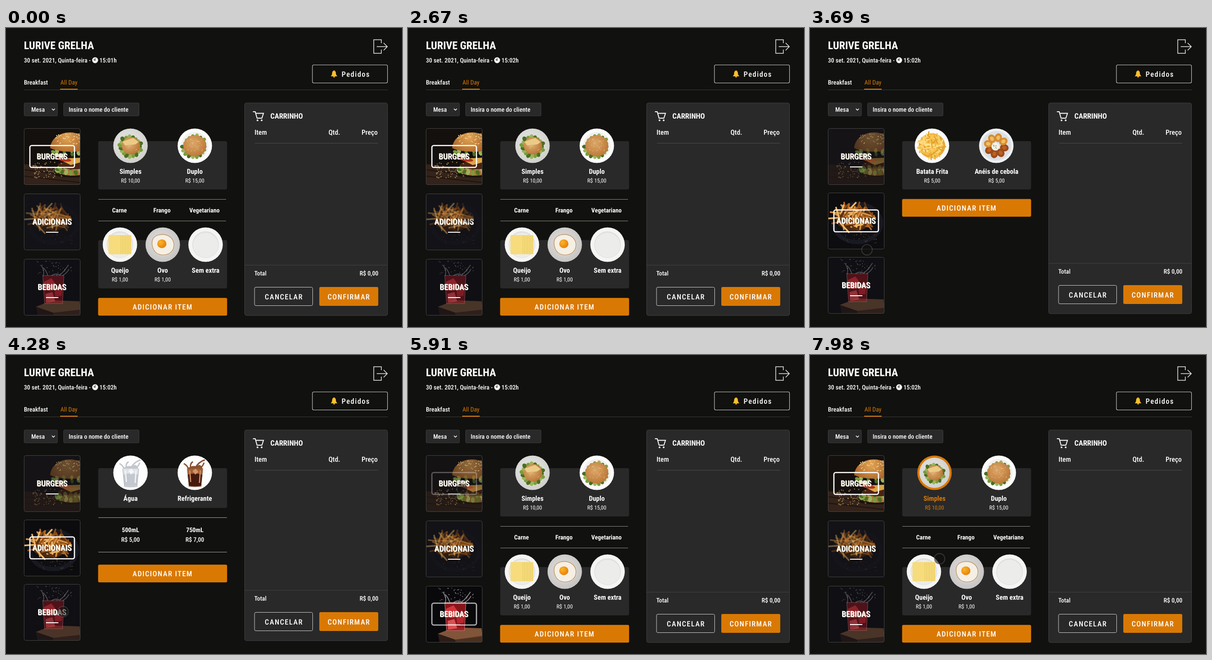
An HTML page with a canvas that plays this animation: 862 px wide and 650 px high, repeating every 8 s.

```html
<!DOCTYPE html>
<html lang="pt-BR">
<head>
<meta charset="utf-8">
<title>Cardápio</title>
<style>
html, body { margin: 0; width: 100%; height: 100%; overflow: hidden; background: #11110f; }
canvas, svg { position: absolute; left: 0; top: 0; width: 862px; height: 650px; }
text {
  font-family: "Roboto Condensed", Roboto, sans-serif;
  font-stretch: 75%;
  text-rendering: geometricPrecision;
  white-space: pre;
}
.label text { text-shadow: 1px 1px 0 #e4dece; }
</style>
</head>
<body>
<canvas id="stage" width="862" height="650"></canvas>
<svg id="words" viewBox="0 0 862 650"></svg>
<script>
const LOOP = 8000, TAU = Math.PI * 2;
const BG = '#11110f', PANEL = '#292929', ORANGE = '#d97904', WHITE = '#fff';
const c = document.getElementById('stage').getContext('2d');
const svg = document.getElementById('words');

// ---------- text ----------
function node(tag, parent, attrs) {
  const el = document.createElementNS('http://www.w3.org/2000/svg', tag);
  for (const k in attrs) el.setAttribute(k, attrs[k]);
  return parent.appendChild(el);
}
const group = (parent = svg, cls = '') => node('g', parent, { class: cls });

// Without a condensed face, use slightly smaller and tighter letters.
const probe = node('text', svg, { 'font-size': 100 });
probe.textContent = 'Insira o nome do cliente';
const wide = probe.getComputedTextLength() > 1010;
probe.remove();

function say(g, str, x, y, size, o = {}) {
  const s = size * (wide ? 0.95 : 1);
  const el = node('text', g, {
    x, y, 'font-size': s, 'font-weight': o.w || 500, fill: o.fill || WHITE,
    'text-anchor': o.a || 'start',
    'letter-spacing': (o.ls || 0) - (wide ? 0.03 * s : 0)
  });
  el.textContent = str;
  return el;
}
const MID = { a: 'middle', w: 400 }, BOLD = { a: 'middle', w: 700 };
const SPACED = { a: 'middle', ls: 1.5 };

const head = group();
say(head, 'LURIVE GRELHA', 39, 46, 23.5, { w: 700 });
say(head, '30 set. 2021, Quinta-feira -', 39, 75, 13.6);
const clock = say(head, '', 203.5, 75, 13.6);
say(head, 'Breakfast', 39, 122.5, 13.6);
say(head, 'All Day', 118.5, 122.5, 13.6, { fill: ORANGE, w: 400 });
say(head, 'Pedidos', 730.5, 106, 16, { ls: 1.5 });
say(head, 'Mesa', 55, 182, 13.6);
say(head, 'Insira o nome do cliente', 136.5, 182, 13.6);
say(head, 'CARRINHO', 575.5, 197, 16.2, { w: 700 });
say(head, 'Item', 541, 232, 15.1);
say(head, 'Qtd.', 702, 232, 15.1);
say(head, 'Preço', 809, 232, 15.1, { a: 'end' });

const foot = group();
say(foot, 'Total', 540.5, 538, 13.6);
say(foot, 'R$ 0,00', 810.5, 538, 13.6, { a: 'end' });
say(foot, 'CANCELAR', 605, 590, 16, SPACED);
say(foot, 'CONFIRMAR', 746.5, 590, 16, SPACED);

const labels = ['BURGERS', 'ADICIONAIS', 'BEBIDAS'].map(s => {
  const g = group(svg, 'label');
  say(g, s, 100, 67.3, 17.6, { a: 'middle', fill: '#fffdf6' });
  return g;
});

const pages = [group(), group(), group()];
function item(g, name, price, x, y) {
  return [say(g, name, x, y, 15, BOLD), price && say(g, price, x, y + 19, 12.2, MID)];
}
const chosen = item(pages[0], 'Simples', 'R$ 10,00', 271, 317);
item(pages[0], 'Duplo', 'R$ 15,00', 411, 317);
['Carne', 'Frango', 'Vegetariano'].forEach((s, i) => say(pages[0], s, 247 + 92.5 * i, 401, 13.6, BOLD));
item(pages[0], 'Queijo', 'R$ 1,00', 248, 532);
item(pages[0], 'Ovo', 'R$ 1,00', 341, 532);
item(pages[0], 'Sem extra', '', 434.5, 532);
item(pages[1], 'Batata Frita', 'R$ 5,00', 266, 317);
item(pages[1], 'Anéis de cebola', 'R$ 5,00', 406, 317);
item(pages[2], 'Água', '', 271, 317);
item(pages[2], 'Refrigerante', '', 411, 317);
[['500mL', 'R$ 5,00'], ['750mL', 'R$ 7,00']].forEach(([size, price], i) => {
  say(pages[2], size, 271 + 140 * i, 385, 13.7, BOLD);
  say(pages[2], price, 271 + 140 * i, 406, 13.5, { a: 'middle' });
});
const buttonY = [587, 372, 456];
pages.forEach((g, i) => say(g, 'ADICIONAR ITEM', 341, buttonY[i] + 25, 16, SPACED));

const pointer = node('circle', svg, {
  r: 11.5, fill: 'rgba(17,17,17,.58)', stroke: 'rgba(125,125,125,.35)', 'stroke-width': 1.8
});

// ---------- drawing helpers ----------
function seeded(s) {
  return () => (s = (s * 16807) % 2147483647) / 2147483647;
}
function box(x, y, w, h, r, fill, stroke, lw = 1) {
  c.beginPath();
  c.roundRect(x, y, w, h, r);
  if (fill) { c.fillStyle = fill; c.fill(); }
  if (stroke) { c.strokeStyle = stroke; c.lineWidth = lw; c.stroke(); }
}
function oval(x, y, rx, ry, fill, turn = 0) {
  c.beginPath();
  c.ellipse(x, y, rx, ry, turn, 0, TAU);
  c.fillStyle = fill;
  c.fill();
}
function path(d, stroke, lw, fill) {
  const p = new Path2D(d);
  if (fill) { c.fillStyle = fill; c.fill(p); }
  if (stroke) { c.strokeStyle = stroke; c.lineWidth = lw; c.stroke(p); }
}
const rule = (x1, x2, y, color) => path(`M${x1} ${y}H${x2}`, color, 1);
function glow(x, y, r, inner, outer) {
  const g = c.createRadialGradient(x, y, 0, x, y, r);
  g.addColorStop(0, inner);
  g.addColorStop(1, outer);
  return g;
}
function leaves(n, x, y, rx, ry, size, seed) {
  const rnd = seeded(seed);
  for (let i = 0; i < n; i++) {
    const a = i / n * TAU, r = 0.85 + rnd() * 0.3;
    oval(x + Math.cos(a) * rx * r, y + Math.sin(a) * ry * r, size, size * 0.7,
      ['#4c6d22', '#7b9c3c', '#9ab45c'][i % 3], a);
  }
}
function fries(n, x, y, rx, ry, len, lw, colors, seed) {
  const rnd = seeded(seed);
  c.lineCap = 'round';
  for (let i = 0; i < n; i++) {
    const a = rnd() * TAU, r = Math.sqrt(rnd()), t = rnd() * Math.PI;
    const px = x + Math.cos(a) * rx * r, py = y + Math.sin(a) * ry * r;
    const dx = Math.cos(t) * len / 2, dy = Math.sin(t) * len / 2;
    path(`M${px - dx} ${py - dy}L${px + dx} ${py + dy}`, colors[i % colors.length], lw);
  }
  c.lineCap = 'butt';
}
function specks(n, x, y, w, h, r, color, seed) {
  const rnd = seeded(seed);
  for (let i = 0; i < n; i++) oval(x + rnd() * w, y + rnd() * h, r * (0.5 + rnd()), r * 0.7, color, rnd() * 3);
}

// ---------- category pictures, 123 by 123 ----------
function burgerPhoto() {
  box(0, 0, 123, 123, 0, '#14100d');
  path('M0 78L123 90V123H0Z', 0, 0, '#33231a');
  path('M0 104L123 118M0 90L80 100', '#1c130d', 2);
  oval(106, 101, 38, 6, '#1d130c');
  oval(106, 94, 30, 9, '#a8743c');
  leaves(16, 102, 91, 30, 6, 6, 5);
  oval(110, 80, 36, 9, '#4a2414');
  path('M72 66L123 64V74L102 80L86 72Z', 0, 0, '#dca646');
  oval(88, 68, 15, 4, '#b3341f', 0.15);
  oval(79, 60, 12, 3, '#e2d9c4', 0.1);
  leaves(13, 100, 52, 38, 4, 5, 8);
  path('M57 43C59 21 79 9 100 9C114 9 126 14 132 22V49C105 53 72 51 57 43Z', 0, 0,
    glow(94, 20, 50, '#e3a555', '#9a541d'));
  specks(36, 70, 12, 53, 22, 1.4, '#efd39b', 41);
  specks(65, 20, 73, 62, 36, 1.3, '#b08c5c', 17);
}
function friesPhoto() {
  box(0, 0, 123, 123, 0, '#0d0d10');
  oval(64, 66, 56, 46, '#191a21');
  oval(64, 66, 47, 37, '#0f0f14');
  oval(57, 56, 40, 27, '#4e2a10');
  fries(66, 57, 54, 43, 26, 25, 3.6, ['#8f4e18', '#d8923f', '#edb868', '#b56b26', '#5c3214'], 77);
  specks(25, 35, 90, 70, 20, 1, '#6a5132', 4);
}
function drinkPhoto() {
  box(0, 0, 123, 123, 0, '#070709');
  path('M26 104L62 90L121 92L123 110L64 117Z', 0, 0, '#9a6644');
  path('M26 104L64 117V123H30Z', 0, 0, '#36211a');
  path('M64 117L123 108V123H64Z', 0, 0, '#5a3826');
  path('M41 36H87L84 97H45Z', 0, 0, '#a4161f');
  path('M43 50L60 42L70 56L58 70L45 66Z', 0, 0, '#e23a40');
  path('M66 62L84 56L82 80L68 82Z', 0, 0, '#c62a32');
  path('M47 76L62 72L68 92L48 95Z', 0, 0, '#ec5f5f');
  path('M41 36L45 97H84L87 36Z', '#c98488', 1.2);
  path('M42 37Q46 26 37 13M52 36Q48 24 42 19M60 36Q70 30 78 35Q88 27 97 13M84 36Q94 31 98 22',
    '#aaa3aa', 1.8);
  specks(36, 28, 4, 76, 32, 1, '#c9c4c9', 23);
}
const photos = [burgerPhoto, friesPhoto, drinkPhoto];

function card(i, y, on) {
  c.save();
  c.translate(39, y);
  c.save();
  c.beginPath();
  c.roundRect(0, 0, 123, 123, 4);
  c.clip();
  c.fillStyle = '#17171d';
  c.fillRect(0, 0, 123, 123);
  c.globalAlpha = 0.42 + 0.58 * on;
  photos[i]();
  c.restore();
  box(0.5, 0.5, 122, 122, 4, null, '#454545');
  c.globalAlpha = on;
  box(13, 37.5, 97, 47.5, 4, null, WHITE, 2.6);
  c.globalAlpha = 1 - on;
  c.fillStyle = WHITE;
  c.fillRect(48, 83, 27, 2);
  c.restore();
  labels[i].setAttribute('transform', `translate(0 ${y})`);
}

// ---------- plates, drawn around their centre ----------
function simple() {
  oval(0, 0, 38, 38, glow(-6, -6, 46, '#e9e9e7', '#cfcfcc'));
  oval(0, 0, 28, 28, '#dbdbd8');
  leaves(19, 0, 2, 21, 19, 7, 12);
  oval(1, 0, 20, 19, glow(-3, -4, 24, '#e2b274', '#b9783a'));
  path('M-18-9L6-17L18-8L10-3L-12-1Z', 0, 0, '#ebca86');
  specks(22, -12, -9, 26, 20, 0.9, '#f0d6a4', 8);
}
function double() {
  oval(0, 0, 38, 38, '#fcfcfb');
  oval(0, 0, 30, 30, '#f0f0ee');
  leaves(18, 0, 2, 23, 21, 6, 16);
  oval(0, 0, 25, 23, glow(-4, -6, 30, '#dca768', '#bd7a3a'));
  specks(34, -17, -15, 34, 27, 0.9, '#ecca94', 28);
}
function cheese() {
  emptyPlate();
  box(-25, -21, 50, 42, 3, '#f6dc7d');
  for (let i = 0; i < 7; i++) path(`M${2 + i * 3.5}-20V20`, '#e5c45d', 0.8);
}
function egg() {
  oval(0, 0, 38, 38, glow(-4, -5, 48, '#e2e1df', '#c4c2c0'));
  oval(0, 0, 27, 26, '#d2d0cd');
  path('M-23 0Q-25-17-9-21Q8-25 19-14Q28-3 22 11Q14 24-3 22Q-20 20-23 0Z', '#b98c57', 1.2, '#f5efe4');
  oval(-2, -2, 10, 9.5, glow(-5, -5, 13, '#fbb52c', '#e68208'));
}
function emptyPlate() {
  oval(0, 0, 38, 38, '#f5f5f4');
  oval(0, 0, 29, 29, '#dfdfde');
  oval(0, 1, 27.5, 27, '#ececeb');
}
function chips() {
  oval(0, 0, 38, 38, '#fafafa');
  oval(0, 0, 29, 27, '#e9a935');
  fries(95, 0, 0, 25, 23, 18, 2.6, ['#e3a02a', '#fbd266', '#f5bf4a', '#fde08c'], 35);
}
function rings() {
  oval(0, 0, 38, 38, '#eef0f2');
  oval(0, 0, 32, 32, '#dcdfe3');
  for (let i = 0; i < 8; i++) {
    const a = (i + 0.3) / 8 * TAU, x = Math.cos(a) * 18, y = Math.sin(a) * 18;
    const low = y > 4;
    oval(x, y, 9.5, 8, low ? '#9a4a1e' : '#d68d33', a);
    oval(x, y, 5, 4, low ? '#c0601f' : '#f0bd62', a);
  }
  oval(-2, 2, 8.5, 8.5, '#f4f2ea');
  specks(8, -6, -2, 8, 8, 1, '#6f9345', 9);
}
function glass(splash, upper, lower, shine) {
  oval(0, 0, 38, 38, '#fdfdfd');
  path('M-14-8Q-16-16-24-20M-8-8Q-12-20-4-24M0-9Q8-24 22-28M10-9Q18-14 20-22', splash, 3);
  path('M-17-9Q-6-17 4-14Q12-22 17-9Z', 0, 0, splash);
  path('M-17-9H18L14 30Q0 32-13 30Z', 0, 0, upper);
  path('M-16 4Q0-1 16 4L14 28Q0 31-13 28Z', 0, 0, lower);
  path('M-11-5L-9 20M12-5L10 22', shine, 2.5);
  path('M-5-4L2-9L8-2L1 4Z', 0, 0, shine);
  path('M-17-9L-13 30Q0 32 14 30L18-9', '#a9abb0', 1);
}
const water = () => glass('#c3c6cd', '#dfe2e7', '#c3c8d0', '#f4f6f8');
const soda = () => glass('#8a5232', '#a4602f', '#46190d', '#d0956a');

function plate(food, x, y, picked) {
  c.save();
  c.translate(x, y);
  c.beginPath();
  c.arc(0, 0, 37.5, 0, TAU);
  c.clip();
  if (picked) {
    oval(0, 0, 38, 38, ORANGE);
    c.scale(0.88, 0.88);
    c.beginPath();
    c.arc(0, 0, 37.5, 0, TAU);
    c.clip();
  }
  food();
  c.restore();
}

// ---------- fixed parts ----------
function header() {
  path('M817 33V25.5H800.5V55H817V47M807 40.5H830M822 32.5L830 40.5L822 48.5', '#e8e8e8', 1.5);
  oval(194, 70, 6.5, 6.5, '#f4f4f4');
  path('M194 71V65.5M194 71L191 68', '#333', 1.3);
  box(667, 80.3, 163.5, 39.2, 3, null, '#d0d0d0', 1.1);
  path('M707 105Q710 102 710 98Q710 93 714 93Q718 93 718 98Q718 102 721.5 105Z', 0, 0, '#fbc02d');
  oval(714.2, 93.5, 1.6, 1.6, '#f0a91c');
  oval(714.2, 106, 2.2, 1.8, '#e59a16');
  rule(39, 831, 134.5, '#3b3b3a');
  c.fillStyle = ORANGE;
  c.fillRect(118, 132, 38, 2);
  box(39.5, 163, 72.5, 28, 2, PANEL, '#3d3d3d');
  path('M100 175.5L103.2 178.7L106.4 175.5', WHITE, 1.6);
  box(125.5, 163, 164, 28, 2, PANEL, '#3d3d3d');
}
function cart(dy) {
  box(519.5, 163, 311, 462 + dy, 4, PANEL, '#414141');
  path('M537.5 182H542.5L546.5 196H557L560.5 185.5H544', WHITE, 1.9);
  oval(547.5, 200.7, 1.9, 1.9, WHITE);
  oval(556.5, 200.7, 1.9, 1.9, WHITE);
  rule(542, 810, 250.5, '#4b4b4b');
  rule(520, 830, 515.5 + dy, '#414141');
  box(541, 563.5 + dy, 126.5, 40, 3, null, '#d0d0d0');
  box(682, 563 + dy, 128.3, 41, 3, ORANGE);
  foot.setAttribute('transform', `translate(0 ${dy})`);
}
const tray = (y, h) => box(200.7, y, 280.6, h, 4, PANEL);

const content = [
  picked => {
    tray(246, 105);
    plate(simple, 271, 256, picked);
    plate(double, 411, 256);
    rule(201, 479, 372.5, '#8d8d8d');
    rule(201, 479, 419.5, '#8d8d8d');
    tray(461, 105);
    [cheese, egg, emptyPlate].forEach((f, i) => plate(f, 248 + 93.2 * i, 471));
  },
  () => {
    tray(246, 105);
    plate(chips, 265.5, 256);
    plate(rings, 405.5, 256);
  },
  () => {
    tray(246, 86.5);
    plate(water, 271, 256);
    plate(soda, 411, 256);
    rule(201, 481, 353.5, '#a5a5a5');
    rule(201, 481, 428.5, '#a5a5a5');
  }
];

// ---------- timeline ----------
// page changes: start, fade length, page
const turns = [[-999, 1, 0], [2740, 300, 1], [4280, 140, 2], [5830, 260, 0]];
// pointer: time, x, y, opacity
const moves = [
  [0, 640, 690, 0], [970, 620, 680, 0], [980, 605, 648, 1], [1590, 253, 332, 1],
  [1720, 229, 326, 1], [2540, 131, 412, 1], [2670, 131, 412, 0.5], [3470, 131, 413, 0.6],
  [3690, 124, 482, 1], [4210, 124, 558, 1], [4970, 124, 558, 0.5], [5320, 130, 470, 0.2],
  [5720, 118, 291, 0.9], [6640, 118, 291, 0.5], [6710, 262, 282, 0.4], [6900, 315, 300, 1],
  [7250, 290, 258, 1], [7780, 290, 258, 1], [7980, 282, 443, 1], [8000, 282, 443, 1]
];

function movePointer(t) {
  const i = moves.findIndex(m => m[0] > t);
  const a = moves[i - 1], b = moves[i], p = (t - a[0]) / (b[0] - a[0]);
  const [, x, y, o] = a.map((v, k) => v + (b[k] - v) * p);
  pointer.setAttribute('cx', x);
  pointer.setAttribute('cy', y);
  pointer.setAttribute('opacity', o);
}

function draw(t) {
  const n = turns.filter(v => v[0] <= t).length - 1;
  const [start, span, page] = turns[n];
  const fade = Math.min(1, (t - start) / span);
  const before = n ? turns[n - 1][2] : -1;
  const picked = t >= 7050;
  const short = page > 0;

  c.fillStyle = BG;
  c.fillRect(0, 0, 862, 650);
  header();
  cart(short ? -4 : 0);
  for (let i = 0; i < 3; i++) {
    const on = i === page ? fade : i === before ? 1 - fade : 0;
    card(i, Math.round(218.3 + i * (short ? 139.8 : 141.9)), on);
  }
  content[page](picked);
  box(200.5, buttonY[page] - 0.3, 280.8, 38.6, 3, ORANGE);

  pages.forEach((g, i) => g.setAttribute('display', i === page ? 'inline' : 'none'));
  chosen.forEach(el => el.setAttribute('fill', picked ? ORANGE : WHITE));
  clock.textContent = t < 2100 ? '15:01h' : '15:02h';
  movePointer(t);
}

const begin = performance.now();
function tick() {
  draw((performance.now() - begin) % LOOP);
  requestAnimationFrame(tick);
}
tick();
</script>
</body>
</html>
```
